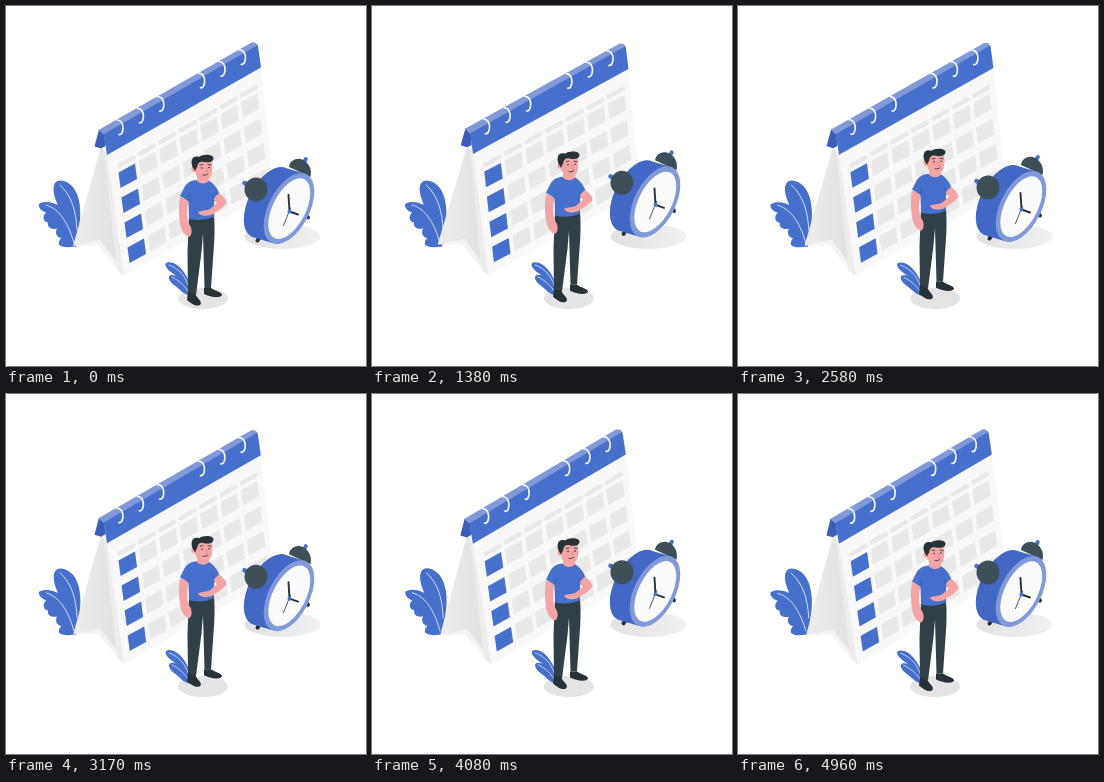
Write an HTML page that moves like this. It is 360x360 px and loops after 5000 ms.

```html
<!DOCTYPE html>
<html lang="en">
<head>
<meta charset="utf-8">
<title>Calendar and alarm clock</title>
<style>
  html, body { margin: 0; width: 100%; height: 100%; overflow: hidden; background: #fff; }
  svg { display: block; width: 100vw; height: 100vh; }
  .blue { fill: #4570cb; }
  .dark { fill: #263238; }
  .slate { fill: #3f4f57; }
  .pants { fill: #314047; }
  .skin { fill: #f3a5a6; }
  .line { fill: none; stroke-linecap: round; stroke-linejoin: round; }
</style>
</head>
<body>
<svg viewBox="0 0 360 360">
  <defs>
    <linearGradient id="fade">
      <stop offset="0" stop-color="#e1e1e1"/>
      <stop offset="1" stop-color="#f1f1f1"/>
    </linearGradient>
    <linearGradient id="inside" x1="0" x2="1">
      <stop offset="0" stop-color="#ededed"/>
      <stop offset="1" stop-color="#e2e2e2"/>
    </linearGradient>
  </defs>

  <ellipse cx="276.500" cy="230.500" rx="38" ry="12.500" fill="url(#fade)"/>
  <ellipse cx="197" cy="292.500" rx="25" ry="10.500" fill="#e4e4e4"/>

  <g id="plant">
    <path class="blue" d="M66 240C58 226 54 208 51 197C48 190 46 182 49 177C53 172 61 175 66 180C74 188 76 206 73 222L70 241Z"/>
    <path class="blue" d="M68 240.500C61 242 55 241 53 238.500C52 235 55 233 55 232C50 231 49 226 51 222.500C45 224 41 221 42 216.500C37 216 36 210 40 206.500C35 205 32 201 33 198C41 193 54 198 60 206L72 236Z"/>
    <path class="line" stroke="#dfe8fb" stroke-width=".9" d="M54 179C66 190 70 205 71 224M40 199C55 203 63 220 68 237"/>
  </g>

  <g id="calendar">
    <path fill="url(#inside)" d="M95 141L67 240L94 235L112 262L101 148Z"/>
    <path fill="#f3f3f3" d="M94 234L67 240L92 239.500L117 270L112 258Z"/>
    <path fill="#ededed" d="M98 146L102 147L119 267L118 270L111 264Z"/>
    <path fill="#f8f8f8" d="M101 148L255 62L268 184L118 270Z"/>
    <g id="cells"></g>
    <path fill="#3a5db5" d="M93 123.500L98 127L99.500 140L95 142.500L88.500 140.500Z"/>
    <path class="blue" d="M97.500 127L250 38.500Q252 38.500 252 40L255 61.500L101 149Z"/>
    <path fill="#8199d9" d="M92.500 124L245.500 36.500Q250 35.500 251.500 39L97.500 128.500Z"/>
    <g id="rings" class="line" stroke="#f4f6fb" stroke-width="1.700"></g>
  </g>

  <g id="clock">
    <path class="line" stroke="#263238" stroke-width="4" d="M257 226L251.500 234.500M299 208L302 211.500"/>
    <path class="line" stroke="#4570cb" stroke-width="4" d="M297.500 157L299.800 153"/>
    <path class="slate" d="M283 161C284 153 293 151 298 154.500C304 158 306 165 304.500 171Z"/>
    <g transform="translate(283 202.500) rotate(27)">
      <path fill="#4068c4" d="M0 -38.500L-20.500 -34.800A20.500 38.500 0 0 0 -20.500 42.200L0 38.500Z"/>
      <ellipse rx="20.500" ry="38.500" fill="#8099d8"/>
      <ellipse cx=".3" rx="16.500" ry="33" fill="#fafafa"/>
    </g>
    <path class="line" stroke="#263238" stroke-width="1.900" d="M283.500 205.500L282.500 189M283.500 205.500L292 208.500"/>
    <path class="line" stroke="#263238" stroke-width=".8" d="M284.500 202L277.500 219.500"/>
    <circle class="blue" cx="283.500" cy="205.500" r="2"/>
    <path class="line" stroke="#4570cb" stroke-width="4.500" d="M238.500 177L243 179.500"/>
    <ellipse class="slate" cx="250" cy="183.500" rx="11.500" ry="12"/>
  </g>

  <g id="sprout">
    <path class="blue" d="M184 289C182 275 176 273 169 269C161 264 157 258 161 256.500C170 254 183 267 187 289Z"/>
    <path class="blue" d="M185 290C176 288 173 282 168 279C163 275 161 270 165 269C174 268 183 277 187 289Z"/>
    <path class="line" stroke="#dfe8fb" stroke-width=".8" d="M163 259C174 263 181 272 184 285M166 271C174 275 180 281 184 288"/>
  </g>

  <g id="man">
    <path class="pants" d="M183 210L208 209C209 222 208.500 234 207.500 246L205 282L198.500 282L197 228L195.500 246L190 289L182 288L181.500 246Z"/>
    <path class="dark" d="M182 286L189 288C192 293 197 296 194 299C189 301 185 297 181 294Z"/>
    <path class="dark" d="M198 282L205 282C209 285 216 286 216 289C214 293 204 291 198 288Z"/>
    <path class="skin" d="M174 191L183 194C180 204 181 213 183 218C187 223 186 230 183 231C179 230 175 225 174 217C172.500 208 172.500 199 174 191Z"/>
    <path class="blue" d="M191 174C184 174 180 178 178 182L174 190L182.500 195L183 213Q196 216 208 211L208 195L214 189C211 181 207 177 202 174Z"/>
    <path class="skin" d="M207 193L213 187C217 190 220.500 194 220.500 197C219 200 212 205 205 209C199 211 193 209 192 206C196 204 201 205 204 203L211 197Z"/>
    <path class="skin" d="M191 167L191 175Q197 180 203 175L202 169Z"/>
    <path class="skin" d="M190 156C192 152 204 152 206 156C207 165 206 173 200 174C194 174 190 170 189 166C185 167 184 160 188 160Z"/>
    <path class="dark" d="M186.500 161C184 154 187 149 193 151C197 148 207 148 207.500 152C207.500 156 203 157 198 156C194 155 192 156 191 161L189 165Z"/>
    <g class="dark">
      <circle cx="196" cy="162" r=".8"/>
      <circle cx="203" cy="161.500" r=".8"/>
    </g>
    <path class="line" stroke="#263238" stroke-width=".8" d="M194 159L197 158.500M202 158.500L205 159M197 169Q200 170 202 168"/>
    <path class="line" stroke="#d98282" stroke-width=".8" d="M200 162L201.500 165.500L200 166"/>
    <path class="line" stroke="#3558ab" stroke-width=".7" d="M182.500 195L184 189M208 195L207 188"/>
  </g>
</svg>
<script>
  const LOOP = 5000;
  const byId = id => document.getElementById(id);

  function addPath(parent, attributes) {
    const path = document.createElementNS("http://www.w3.org/2000/svg", "path");
    for (const [name, value] of Object.entries(attributes)) path.setAttribute(name, value);
    parent.append(path);
  }

  function buildCells() {
    for (let col = 0; col < 7; col++) {
      const x = 122 + col * 20.4, y = 169.5 - col * 11.7;
      addPath(byId("cells"), {
        d: `M${x - 8.5} ${y - 10}l14 -8`,
        stroke: "#e9e9e9", "stroke-width": 4.5, "stroke-linecap": "round"
      });
      for (let row = 0; row < 4; row++) {
        addPath(byId("cells"), {
          d: `M${x + row * 3 - 9.5} ${y + row * 25 - 3}l16.500 -9l2 15.500l-16.500 9z`,
          fill: col ? "#e9e9e9" : "#4570cb"
        });
      }
    }
  }

  function buildRings() {
    for (const step of [0, 1, 2, 4, 5, 6]) {
      addPath(byId("rings"), {
        d: `M${111 + step * 20.4} ${114 - step * 11.7}c4 0 6.500 4 6 9c-.4 4 -2 6 -4 5.500`
      });
    }
  }

  // Linear rise and fall: 0 -> 1 -> 0 over one period.
  const rise = (t, period) => 1 - Math.abs(1 - 2 * (t % period) / period);

  // Linear sway: 0 -> 1 -> -1 -> 0 over one period.
  const sway = (t, period) => {
    const phase = t % period / period;
    return phase < .25 ? 4 * phase : phase < .75 ? 2 - 4 * phase : 4 * phase - 4;
  };

  const float = (id, t, period) =>
    byId(id).setAttribute("transform", `translate(0 ${-7.2 * rise(t, period)})`);

  const swing = (id, t, period, x, y) =>
    byId(id).setAttribute("transform", `rotate(${sway(t, period)} ${x} ${y})`);

  function draw(t) {
    float("man", t, 6000);
    float("clock", t, 3000);
    swing("calendar", t, 6000, 167, 153);
    swing("plant", t, 3000, 66, 241);
    swing("sprout", t, 3000, 186, 290);
  }

  buildCells();
  buildRings();
  draw(0);
  const start = performance.now();
  requestAnimationFrame(function tick() {
    draw((performance.now() - start) % LOOP);
    requestAnimationFrame(tick);
  });
</script>
</body>
</html>
```
